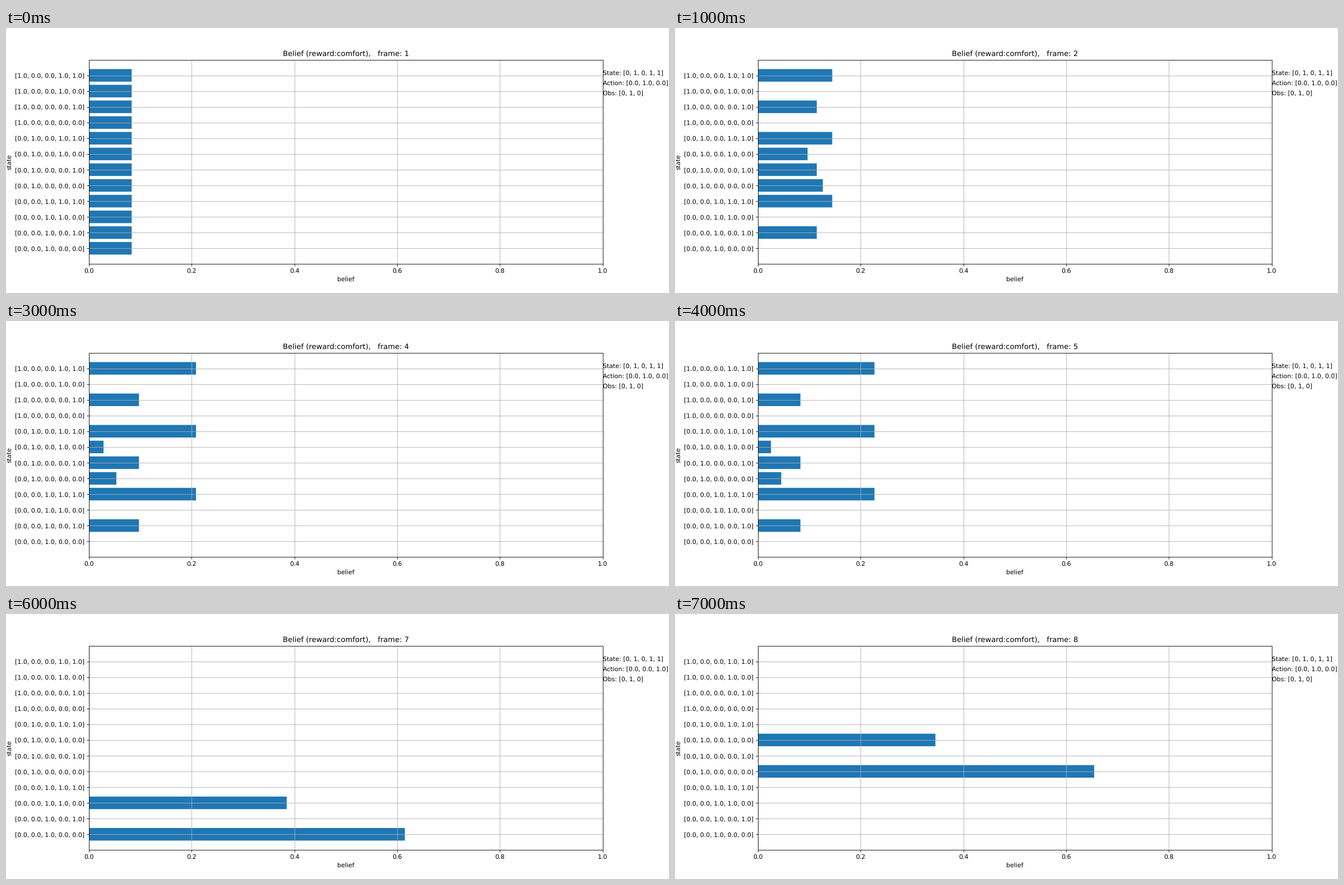
These frames come from a looping animation (1183x473 px, 8 s). A matplotlib script:

```python
from itertools import product

import matplotlib.pyplot as plt
import numpy as np
from matplotlib.animation import FuncAnimation

W, H = 1183, 473
DPI = W / 15  # a 15 inch wide figure
plt.rcParams["font.family"] = "DejaVu Sans"
plt.rcParams["text.hinting"] = "none"

# A state is a one-hot triple followed by two flags.
one_hot = [(0.0, 0.0, 1.0), (0.0, 1.0, 0.0), (1.0, 0.0, 0.0)]
states = [list(t + f) for t, f in product(one_hot, product((0.0, 1.0), repeat=2))]


def mixed(both, last, first, none):
    """Belief by flags; without the last flag only the middle triple survives."""
    belief = np.zeros((3, 4))
    belief[:, 3] = both
    belief[:, 1] = last
    belief[1, 2] = first
    belief[1, 0] = none
    return belief.ravel()


def pair(triple, none, first):
    """Belief split between two states of one triple."""
    belief = np.zeros((3, 4))
    belief[triple, [0, 2]] = none, first
    return belief.ravel()


beliefs = [
    np.full(12, 1 / 12),
    mixed(0.1447, 0.1146, 0.0967, 0.1264),
    mixed(0.1837, 0.1120, 0.0440, 0.0690),
    mixed(0.2085, 0.0975, 0.0285, 0.0535),
    mixed(0.2269, 0.0828, 0.0255, 0.0455),
    mixed(0.2424, 0.0690, 0.0245, 0.0408),
    pair(0, 0.615, 0.385),
    pair(1, 0.6545, 0.3455),
]
actions = [[0.0, 1.0, 0.0]] * 6 + [[0.0, 0.0, 1.0], [0.0, 1.0, 0.0]]
observations = [[0, 1, 0]] * 5 + [[0, 0, 1]] + [[0, 1, 0]] * 2

# The tiny margin keeps the pixel size from being truncated.
fig, ax = plt.subplots(figsize=((W + 1e-6) / DPI, (H + 1e-6) / DPI), dpi=DPI)
fig.subplots_adjust(left=0.125, right=0.9, bottom=0.11, top=0.88)

bars = ax.barh(range(12), beliefs[0], color="#1f77b4", snap=False)
ax.set_yticks(range(12), [str(s) for s in states])
ax.set_xlim(0, 1)
ax.set_xlabel("belief")
ax.set_ylabel("state")
ax.grid(True)
title = ax.set_title("")


def note(y, text=""):
    return ax.text(1.0, y, text, transform=ax.transAxes, va="top")


note(0.95, "State: [0, 1, 0, 1, 1]")
action_note = note(0.90)
obs_note = note(0.85)


def update(i):
    for bar, value in zip(bars, beliefs[i]):
        bar.set_width(value)
    title.set_text(f"Belief (reward:comfort),   frame: {i + 1}")
    action_note.set_text(f"Action: {actions[i]}")
    obs_note.set_text(f"Obs: {observations[i]}")
    return [*bars, title, action_note, obs_note]


anim = FuncAnimation(fig, update, frames=len(beliefs), interval=1000, repeat=True)
plt.show()
```
